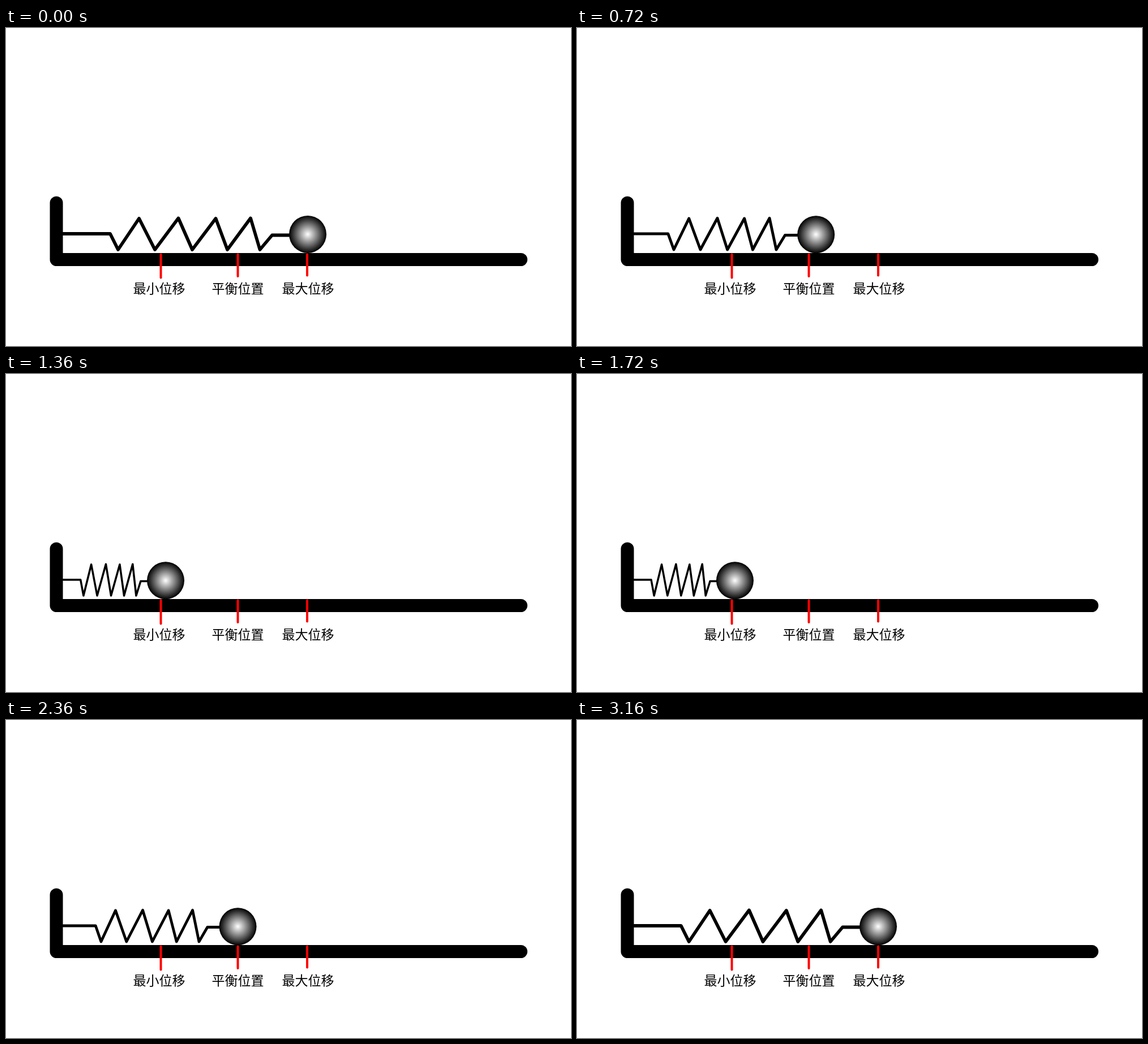
Animation, 998 px wide and 561 px high, one loop 3200 ms. Source, as an HTML page with a canvas:

```html
<!DOCTYPE html>
<html lang="zh">
<head>
<meta charset="utf-8">
<title>弹簧振子</title>
<style>
  html, body { margin: 0; width: 100%; height: 100%; overflow: hidden; background: #fff; }
  canvas, svg { position: absolute; left: 0; top: 0; display: block; }
  text { font: 300 23px KaiTi, "Noto Sans CJK SC", "Noto Sans CJK", sans-serif; text-anchor: middle; }
</style>
</head>
<body>
<canvas id="stage" width="998" height="561"></canvas>
<svg width="998" height="561">
  <text x="270.5" y="468">最小位移</text>
  <text x="409.5" y="468">平衡位置</text>
  <text x="533.5" y="468">最大位移</text>
</svg>
<script>
const ctx = document.getElementById('stage').getContext('2d');
const STEP = 40, COUNT = 80;
const R = 33, WALL = 100.8, START = 533, REST = 409.5, MIN = 273.5, MAX = 532;

// spring at full stretch
const SPRING = [
  [100.8, 363], [184, 363], [198, 391], [235, 336], [263, 391], [304.5, 335.5], [329, 391],
  [370.5, 336], [391, 391], [432, 335.5], [448.5, 391], [470, 365.5], [500, 365.5]
];
const TICKS = [[273.5, 440.5], [409.5, 438], [532, 436.5]];

const easeIn = u => u * u;
const easeOut = u => 1 - (1 - u) * (1 - u);
const mix = (a, b, u) => a + (b - a) * u;

function ballX(n) {
  if (n < 19) return mix(START, REST, easeIn(n / 19));
  if (n < 39) return mix(REST, MIN, easeOut((n - 19) / 20));
  if (n < 59) return mix(MIN, REST, easeIn((n - 39) / 20));
  return mix(REST, MAX, easeOut((n - 59) / 20));
}

function line(points, width, color) {
  ctx.beginPath();
  points.forEach(([x, y]) => ctx.lineTo(x, y));
  ctx.lineWidth = width;
  ctx.strokeStyle = color;
  ctx.stroke();
}

function ball(x, y) {
  const g = ctx.createRadialGradient(x, y, 0, x, y, R);
  g.addColorStop(0, '#fff');
  g.addColorStop(1, '#000');
  ctx.fillStyle = g;
  ctx.beginPath();
  ctx.arc(x, y, R, 0, Math.PI * 2);
  ctx.fill();
}

function draw(n) {
  ctx.clearRect(0, 0, 998, 561);
  ctx.lineCap = ctx.lineJoin = 'round';
  const x = ballX(n);
  const y = mix(363.9, 364.3, Math.min(1, easeIn(n / 19)));
  const s = (x - R - WALL) / (START - R - WALL);

  line(SPRING.map(([px, py]) => [WALL + (px - WALL) * s, py]), 5.8 * Math.sqrt(s), '#000');
  line([[89, 308.5], [89, 408.5], [909.5, 408.5]], 23, '#000');
  ball(x, y);
  TICKS.forEach(([tx, end]) => line([[tx, 399.5], [tx, end]], 4, '#f00'));
}

const t0 = performance.now();
function tick(now) {
  const t = Math.max(0, now - t0);
  draw(Math.floor(t / STEP + 0.01) % COUNT);
  requestAnimationFrame(tick);
}
draw(0);
requestAnimationFrame(tick);
</script>
</body>
</html>
```
